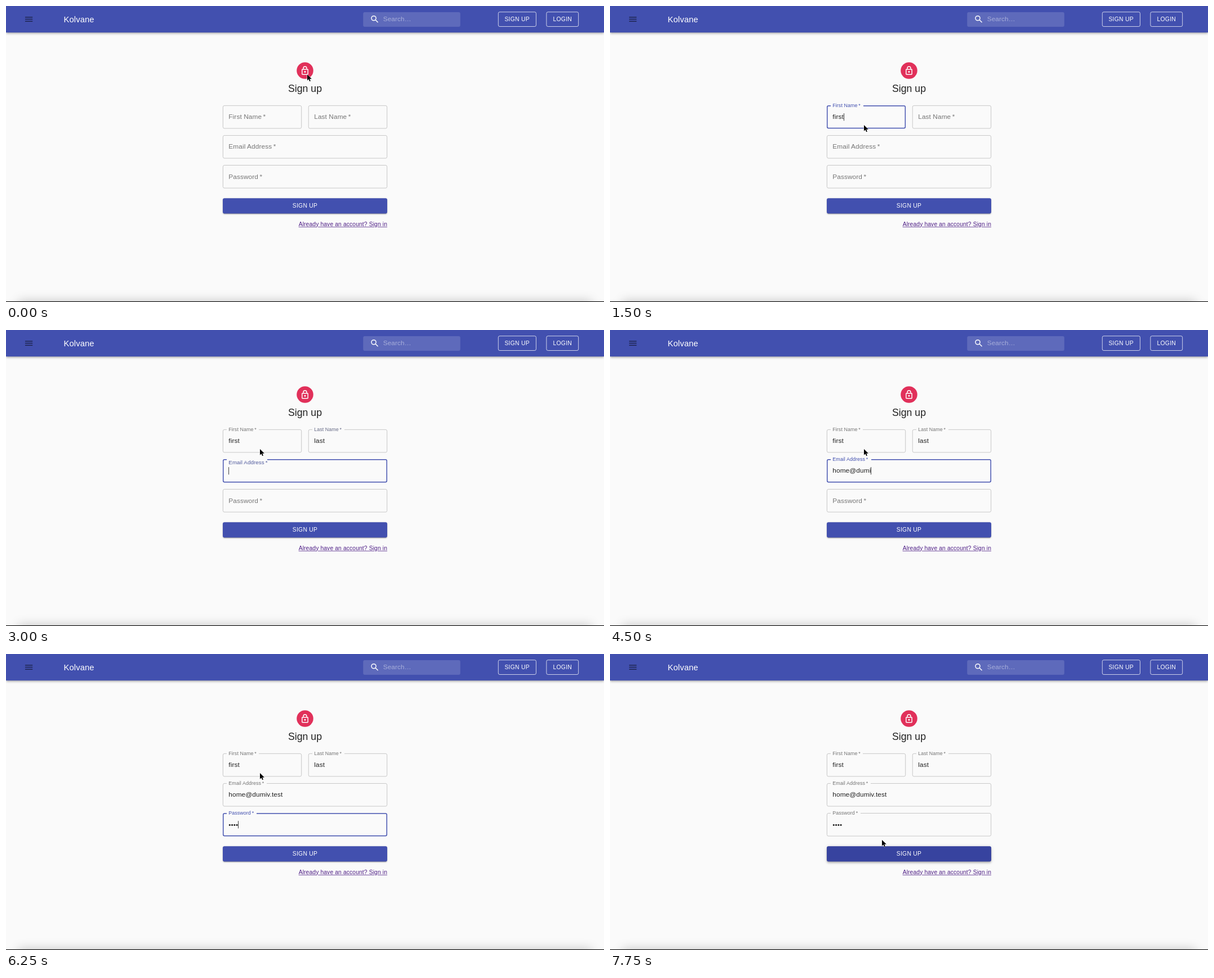
An HTML page that plays this animation: 1062 px wide and 527 px high, repeating every 8000 ms.

```html
<!DOCTYPE html>
<html lang="en">
<head>
<meta charset="utf-8">
<title>Sign up form</title>
<style>
  :root { --indigo: #4250af; --ink: #212121; }
  html, body { margin: 0; width: 100%; height: 100%; overflow: hidden; background: #fafafa; }
  #stage {
    position: relative; width: 1440px; height: 714.6px; overflow: hidden;
    transform: scale(.7375); transform-origin: 0 0;
    font: 16px "Liberation Sans", Arial, sans-serif; letter-spacing: .15px; color: var(--ink);
  }
  #stage * { box-sizing: border-box; }
  #stage div, #stage svg, label, fieldset { position: absolute; white-space: nowrap; }
  #bar {
    width: 1440px; height: 64px; background: var(--indigo); color: #fff;
    box-shadow: 0 2px 4px -1px #0003, 0 4px 5px #00000024, 0 1px 10px #0000001f;
  }
  #brand { left: 139px; top: 16px; font-size: 20px; line-height: 32px; }
  #search { left: 860px; top: 15px; width: 234px; height: 35px; border-radius: 4px; background: #ffffff26; }
  #search span { position: absolute; left: 48px; top: 0; line-height: 34px; opacity: .45; }
  .button {
    height: 36.5px; border-radius: 4px; color: #fff;
    font-size: 14px; line-height: 36px; letter-spacing: .4px; text-align: center;
  }
  .outlined { top: 13.5px; border: 1px solid #fff; line-height: 34px; }
  #avatar { left: 700px; top: 136px; width: 40px; height: 40px; border-radius: 50%; background: #e1305a; }
  #heading { left: 522px; top: 184px; width: 396px; text-align: center; font-size: 24px; line-height: 32px; letter-spacing: 0; }
  #submit { left: 522px; top: 464px; width: 396px; }
  #link {
    right: 522px; top: 516.5px; font-size: 14px; line-height: 20px;
    color: #4e1e86; text-decoration: underline;
  }
  .field { height: 56px; }
  .field label { left: 14px; top: 0; line-height: 16px; transform-origin: 0 0; }
  .field fieldset { inset: -5px 0 0; margin: 0; padding: 0 8px; border: 1px solid #b6b6b6; border-radius: 4px; min-width: 0; }
  .field legend { padding: 0; font-size: 12px; line-height: 11px; max-width: .01px; overflow: hidden; visibility: hidden; }
  .field legend span { padding: 0 5px; }
  .field .value { left: 14px; top: 18px; line-height: 19px; height: 19px; }
  .value::after { content: ""; display: inline-block; height: 18px; vertical-align: -4px; }
  .open legend { max-width: none; }
  .focus fieldset { border: 2px solid var(--indigo); }
  .focus .value::after { border-left: 1.3px solid #000; }
  #shelf { left: 30px; top: 713px; width: 1380px; height: 40px; box-shadow: 0 0 26px #00000038; }
  #edge { left: 0; top: 713px; width: 1440px; height: 2px; background: #111; }
</style>
</head>
<body>
<div id="stage">
  <div id="bar">
    <svg style="left:43px;top:20px" width="24" height="24" fill="none" stroke="#000" stroke-opacity=".54" stroke-width="2"><path d="M3 7h18M3 12h18M3 17h18"/></svg>
    <div id="brand">Kolvane</div>
    <div id="search">
      <svg style="left:16px;top:5px" width="24" height="24" fill="none" stroke="#fff" stroke-width="2"><circle cx="9.5" cy="9.5" r="5.5"/><path d="M13.6 13.6L19.7 19.7"/></svg>
      <span>Search…</span>
    </div>
    <div class="button outlined" style="left:1184.5px;width:92.5px">SIGN UP</div>
    <div class="button outlined" style="left:1301px;width:78px">LOGIN</div>
  </div>
  <div id="avatar">
    <svg style="left:8px;top:8px" width="24" height="24" fill="none" stroke="#fff" stroke-width="2"><rect x="5" y="9" width="14" height="12" rx="1"/><path d="M8 9V6a4 4 0 0 1 8 0v3"/><circle cx="12" cy="15" r="2" fill="#fff" stroke="none"/></svg>
  </div>
  <div id="heading">Sign up</div>
  <div id="submit" class="button">SIGN UP</div>
  <div id="link">Already have an account? Sign in</div>
  <div id="shelf"></div>
  <div id="edge"></div>
  <svg id="cursor" width="16" height="22" overflow="visible" style="left:0;top:0;z-index:1"><path d="M0 0v14.5l3.4-3.2 2.2 5.2 2.4-1-2.2-5.1h4.8z" fill="#000" stroke="#fff" stroke-width="1.2" paint-order="stroke"/></svg>
</div>
<script>
const LOOP = 8000, TICK = 250, KEY_TIME = 125, FADE = 200;
const stage = document.getElementById('stage');
const submit = document.getElementById('submit');
const cursor = document.getElementById('cursor');

const fields = [
  { label: 'First Name', text: 'first', x: 522, y: 240, w: 190, focus: 790, type: 875, blur: 1540 },
  { label: 'Last Name', text: 'last', x: 728, y: 240, w: 190, focus: 1540, type: 1875, blur: 2930 },
  { label: 'Email Address', text: 'home@dumiv.test', x: 522, y: 312, w: 396, focus: 2930, type: 3375, blur: 5290 },
  { label: 'Password', text: '••••', x: 522, y: 384, w: 396, focus: 5290, type: 5625, blur: 7290 },
];

// [tick, x, y]: the pointer stays at each place until the next tick listed
const pointer = [
  [0, 535, 122], [1, 522, 138], [2, 482, 184], [3, 451, 212],
  [26, 453, 238], [27, 459, 318], [28, 463, 358], [31, 483, 331],
];

for (const f of fields) {
  f.el = document.createElement('div');
  f.el.style.cssText = `left:${f.x}px;top:${f.y}px;width:${f.w}px`;
  f.el.innerHTML = `<fieldset><legend><span>${f.label}&nbsp;*</span></legend></fieldset>
    <label>${f.label}\u2009*</label><div class="value"></div>`;
  f.name = f.el.querySelector('label');
  f.value = f.el.querySelector('.value');
  stage.append(f.el);
}

const ease = ms => 1 - (1 - Math.min(1, Math.max(0, ms / FADE))) ** 2.8;
const mix = (a, b, p) => `color-mix(in srgb, ${b} ${p * 100}%, ${a})`;

function drawField(f, t) {
  const up = ease(t - f.focus);
  const active = up - ease(t - f.blur);
  const open = t >= f.focus, focused = open && t < f.blur;
  f.el.className = 'field' + (open ? ' open' : '') + (focused ? ' focus' : '');
  f.name.style.transform = `translateY(${20 - 26 * up}px) scale(${1 - .25 * up})`;
  f.name.style.color = mix('#757575', '#4250af', active);
  f.value.textContent = f.text.slice(0, Math.max(0, Math.floor((t - f.type) / KEY_TIME)));
}

function draw(now) {
  const tick = Math.floor(now % LOOP / TICK), t = tick * TICK;
  fields.forEach(f => drawField(f, t));

  const [, x, y] = pointer.findLast(p => p[0] <= tick);
  cursor.style.transform = `translate(${x / .7375}px, ${y / .7375}px)`;

  const hover = ease(t - 6800) - ease(t - 7730);
  submit.style.background = mix('#4250af', '#333f99', hover);
  submit.style.boxShadow = hover > 0
    ? '0 2px 4px -1px #0003, 0 4px 5px #00000024, 0 1px 10px #0000001f'
    : '0 3px 1px -2px #0003, 0 2px 2px #00000024, 0 1px 5px #0000001f';
}

const start = performance.now();
function frame() {
  draw(performance.now() - start);
  requestAnimationFrame(frame);
}
frame();
</script>
</body>
</html>
```
